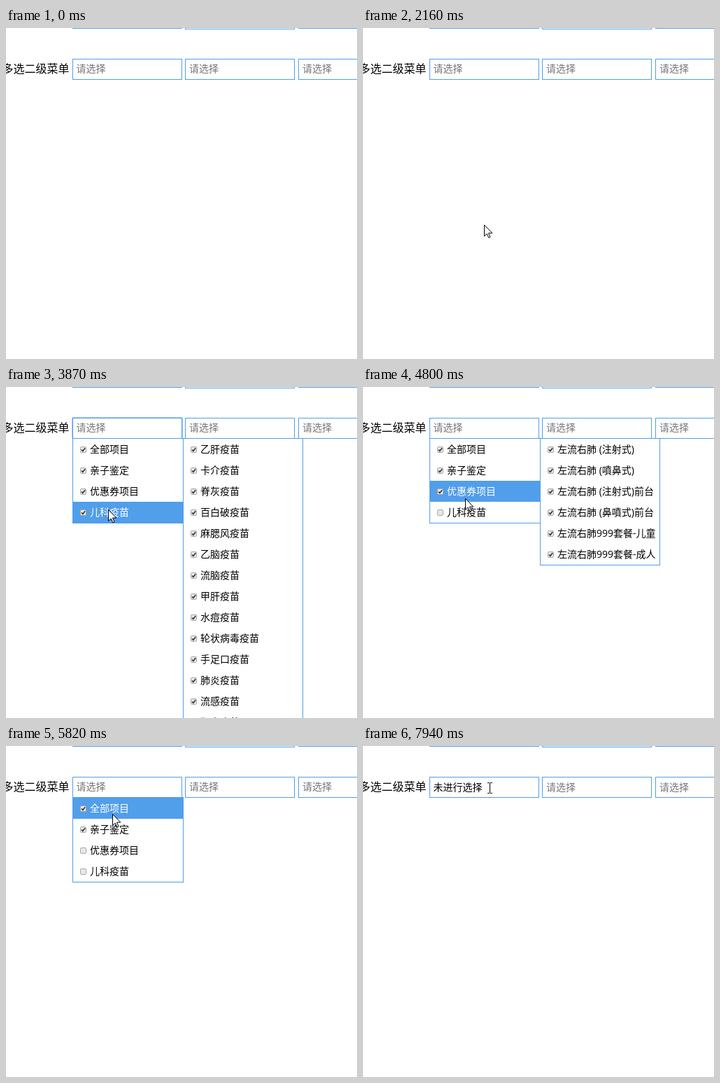
Animation, 502 px wide and 473 px high, one loop 8000 ms. Source, as an HTML page with a canvas:

```html
<!DOCTYPE html>
<html lang="zh-CN">
<head>
<meta charset="utf-8">
<style>
html, body { margin: 0; width: 100%; height: 100%; overflow: hidden; background: #fff; }
canvas { display: block; }
</style>
</head>
<body>
<canvas id="stage" width="502" height="473"></canvas>
<script>
const ctx = document.getElementById('stage').getContext('2d');
const LOOP = 8000, TICK = 77, BLUE = '#519eeb', ROW = 30, TOP = 74;
const FONT = '"Open Sans", "Noto Sans CJK SC", "Noto Sans CJK", sans-serif';

const vaccines = '乙肝 卡介 脊灰 百白破 麻腮风 乙脑 流脑 甲肝 水痘 轮状病毒 手足口 肺炎 流感 狂犬';
const menu = [
  { label: '全部项目', uncheckAt: 6290, items: [] },
  { label: '亲子鉴定', uncheckAt: 6290, scrolls: true, items:
    ['已出生-无法效- 1+1', '已出生- 有法效- 1+1', '亲子鉴定', '亲缘鉴定-已出生-无', '亲缘鉴定-已出生-有'] },
  { label: '优惠券项目', uncheckAt: 5190, items:
    ['左流右肺 (注射式)', '左流右肺 (噴鼻式)', '左流右肺 (注射式)前台', '左流右肺 (鼻噴式)前台',
      '左流右肺999套餐-儿童', '左流右肺999套餐-成人'] },
  { label: '儿科疫苗', uncheckAt: 4340, items: vaccines.split(' ').map(name => name + '疫苗') }
];

// Pointer moves: start, end, destination
const moves = [
  [300, 990, 157, 53],
  [1610, 1860, 173, 281],
  [2550, 2950, 150, 65],
  [3180, 3320, 147, 107],
  [3420, 3870, 146, 175],
  [4500, 4800, 146, 159],
  [5270, 5820, 152, 97],
  [6600, 6900, 144, 235],
  [7530, 7940, 181, 60]
];

// Each move is seen as evenly timed steps that slow down towards the end
const steps = [];
let from = [420, 480];
for (const [start, end, ...to] of moves) {
  const gaps = Math.round((end - start) / TICK);
  for (let i = 0; i <= gaps; i++) {
    const p = (i + 1) / (gaps + 1), ease = p * (2 - p);
    const [x, y] = from.map((v, axis) => Math.round(v + (to[axis] - v) * ease));
    steps.push({ t: start + (end - start) * i / gaps, x, y });
  }
  from = to;
}

const within = (v, a, b) => v >= a && v < b;

function rect(x, y, w, h, color) {
  ctx.fillStyle = color;
  ctx.fillRect(x, y, w, h);
}

function frame(x, y, w, h) {
  rect(x, y, w, h, BLUE);
  rect(x + 1, y + 1, w - 2, h - 2, '#fff');
}

function text(str, x, y, color = '#000', size = 14) {
  ctx.font = `${size}px ${FONT}`;
  ctx.fillStyle = color;
  ctx.fillText(str, x, y);
}

function path(points) {
  ctx.beginPath();
  points.forEach(([x, y]) => ctx.lineTo(x, y));
}

function stroke(color, width = 1) {
  ctx.strokeStyle = color;
  ctx.lineWidth = width;
  ctx.stroke();
}

function fill(color) {
  ctx.fillStyle = color;
  ctx.fill();
}

function checkbox(x, y, checked) {
  ctx.beginPath();
  ctx.roundRect(x + .5, y + .5, 8, 8, 1.5);
  fill('#e8e8e8');
  stroke('#a8a8a8');
  if (!checked) return;
  path([[x + 2, y + 4.5], [x + 3.8, y + 6.5], [x + 7.2, y + 2.3]]);
  stroke('#333', 1.7);
}

function item(label, x, row, checked, color) {
  const y = TOP + row * ROW;
  checkbox(x, y + 11, checked);
  text(label, x + 14, y + 20, color);
}

function scrollArrow(y, direction, color) {
  path([[411.5, y], [415.5, y + 4 * direction], [419.5, y]]);
  fill(color);
}

function scrollbar() {
  rect(407, 74, 17, 150, '#f1f1f1');
  rect(409, 91, 13, 100, '#c1c1c1');
  scrollArrow(85, -1, '#a3a3a3');
  scrollArrow(213, 1, '#505050');
}

function submenu({ items, scrolls }, checked) {
  frame(253, 73, 172, items.length * ROW + 2);
  if (scrolls) {
    text('法效', 259.5, 214);
    scrollbar();
  }
  items.forEach((label, i) => item(label, 264, i, checked));
}

function pointer({ x, y }) {
  if (within(x, 95, 252) && within(y, 44, 73)) {
    rect(x, y - 7, 1, 14, '#000');
    for (const edge of [y - 8, y + 7]) {
      rect(x - 3, edge, 3, 1, '#000');
      rect(x + 1, edge, 3, 1, '#000');
    }
    return;
  }
  path([[0, 0], [0, 16], [3.7, 12.6], [6.4, 18.3], [8.6, 17.3], [6, 11.6], [11.3, 11.6]]
    .map(([dx, dy]) => [x + .5 + dx, y + .5 + dy]));
  ctx.closePath();
  fill('#fff');
  stroke('#000');
}

const rowAt = ({ x, y }) =>
  within(x, 96, 253) && within(y, TOP, TOP + menu.length * ROW) ? Math.floor((y - TOP) / ROW) : -1;

function draw(t) {
  const openedAt = within(t, 1330, 2090) ? 1330 : within(t, 3175, 7070) ? 3175 : 0;
  const focused = within(t, 1260, 2090) || within(t, 3100, 4250);
  const done = t >= 7070;
  const past = steps.filter(s => s.t <= t + .01);
  const mouse = past.at(-1);

  rect(0, 0, 502, 473, '#fff');
  text('多选二级菜单', -5.5, 64, '#000', 16);
  [95, 256, 418].forEach((x, i) => {
    frame(x, i === 1 ? -28 : -29, 157, 30);
    frame(x, 44, 157, 30);
    const chosen = done && i === 0;
    text(chosen ? '未进行选择' : '请选择', x + (i ? 6 : 5.5), done ? 64 : 63, chosen ? '#000' : '#757575');
  });
  if (focused) {
    ctx.beginPath();
    ctx.roundRect(94.5, 43.5, 158, 31, 1);
    stroke('#a4c4f8');
  }

  if (openedAt) {
    const hover = mouse ? rowAt(mouse) : -1;
    const active = past.filter(s => s.t >= openedAt).map(rowAt).filter(r => r >= 0).pop();
    frame(95, 73, 159, menu.length * ROW + 2);
    menu.forEach(({ label, uncheckAt }, i) => {
      if (i === hover) rect(96, TOP + i * ROW, 157, ROW, BLUE);
      item(label, 106, i, t < uncheckAt, i === hover ? '#fff' : '#000');
    });
    if (active > 0) submenu(menu[active], t < menu[active].uncheckAt);
  }
  if (mouse) pointer(mouse);
}

const began = performance.now();
function tick() {
  draw((performance.now() - began) % LOOP);
  requestAnimationFrame(tick);
}
tick();
</script>
</body>
</html>
```
